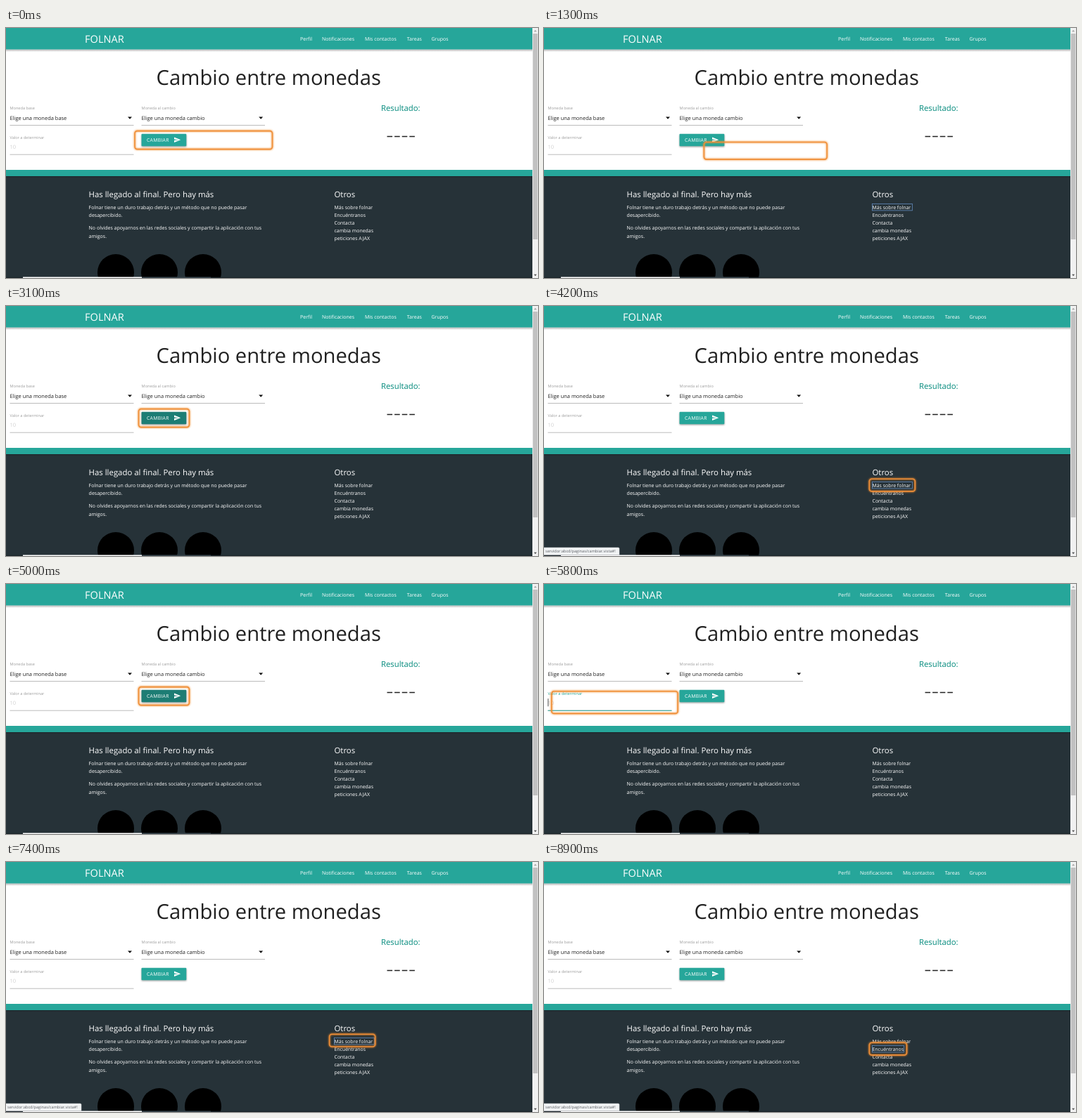
Animation, 756 px wide and 356 px high, one loop 9.8 s. Source, as an HTML page:

```html
<!DOCTYPE html>
<html lang="es">
<head>
<meta charset="utf-8">
<title>Cambio entre monedas</title>
<style>
  html, body { margin: 0; width: 100%; height: 100%; overflow: hidden; background: #fff; }
  svg { display: block; width: 756px; height: 356px; }
  text { font-family: "Open Sans", "Noto Sans", sans-serif; text-rendering: geometricPrecision; }
</style>
</head>
<body>
<svg id="stage" viewBox="0 0 756 356">
  <defs>
    <filter id="soft" x="-20%" y="-60%" width="140%" height="220%"><feGaussianBlur stdDeviation="1.3"/></filter>
    <linearGradient id="shade" x2="0" y2="1">
      <stop stop-color="#000" stop-opacity=".3"/>
      <stop offset="1" stop-color="#000" stop-opacity="0"/>
    </linearGradient>
  </defs>
  <rect width="756" height="356" fill="#fff"/>

  <rect y="30.5" width="748" height="3.5" fill="url(#shade)"/>
  <rect width="748" height="30.5" fill="#26a69a"/>

  <path d="M5.5 138.5H181.5M192.5 138.5H368M5.5 180.2H181.5" stroke="#9e9e9e" stroke-width=".7"/>
  <path id="inputLine" d="M5.5 180.2H181.5" stroke="#26a69a" stroke-width="1.1"/>
  <path d="M173 126.6h6l-3 3.2zM359.2 126.6h6l-3 3.2z" fill="#111"/>
  <path d="M541.5 154.5H581.5" stroke="#222" stroke-width="1.7" stroke-dasharray="7.6 3"/>

  <rect x="192.5" y="152" width="64" height="17.5" rx="1" fill="#000" opacity=".35" filter="url(#soft)"/>
  <rect id="button" x="192.5" y="150.8" width="63.8" height="17.4" rx="1"/>
  <path d="M239 163V159.9L245.5 159.2 239 158.5V155.4L248.2 159.2z" fill="#fff"/>

  <rect y="202" width="748" height="9.5" fill="#26a69a"/>
  <rect y="211" width="748" height="145" fill="#263238"/>
  <rect y="211" width="748" height="2" fill="url(#shade)"/>
  <circle cx="156" cy="348" r="26"/>
  <circle cx="218" cy="348" r="26"/>
  <circle cx="280" cy="348" r="26"/>

  <g id="labels"></g>
  <path id="caret" d="M5.9 163.2V174.3" stroke="#222" stroke-width=".8"/>
  <rect id="outline" fill="none" stroke="#6d9bd6" stroke-width=".7"/>

  <rect x="748" width="8" height="356" fill="#f1f1f1"/>
  <rect x="748.8" y="8" width="6.6" height="293" fill="#c1c1c1"/>
  <path d="M750.2 5.2h4l-2-2.4z" fill="#a3a3a3"/>
  <path d="M750.2 350.8h4l-2 2.4z" fill="#505050"/>

  <path d="M0 355.4H748" stroke="#1b2429" stroke-width="1.2"/>
  <path d="M193 355.2H291" stroke="#37434a" stroke-width="1.4"/>
  <path d="M24 355.3H193" stroke="#fff" stroke-width="1.4"/>
  <g id="status">
    <path d="M-1 344H105.5Q107 344 107 345.5V354.5H-1z" fill="#f1f3f4" stroke="#c4c7ca" stroke-width=".6"/>
    <text x="2" y="351.4" font-size="5.6" fill="#5f6368">servidor:abcd/paginas/cambiar.vista#!</text>
  </g>

  <rect class="ring" rx="3.5" fill="none" stroke="#f28a2a" stroke-width="3" opacity=".65" filter="url(#soft)"/>
  <rect class="ring" rx="3.5" fill="none" stroke="#ef8f38" stroke-width="1.6"/>
</svg>

<script>
const $ = id => document.getElementById(id);
const LOOP = 9800, FLIGHT = 300;

function setAttrs(el, attrs) {
  for (const key in attrs) el.setAttribute(key, attrs[key]);
  return el;
}

function label(x, y, size, fill, content, spacing = 0) {
  const el = document.createElementNS("http://www.w3.org/2000/svg", "text");
  setAttrs(el, { x, y, "font-size": size, fill, "letter-spacing": spacing });
  el.textContent = content;
  return $("labels").appendChild(el);
}

function lines(x, y, size, leading, list) {
  list.forEach((line, i) => label(x, y + i * leading, size, "#fff", line));
}

label(112, 21.3, 14.6, "#fff", "FOLNAR");
[[418, "Perfil"], [449, "Notificaciones"], [510, "Mis contactos"], [569.8, "Tareas"], [604.5, "Grupos"]]
  .forEach(([x, name]) => label(x, 18, 7, "#fff", name));

label(213.6, 81, 29.2, "#212121", "Cambio entre monedas");
label(5.5, 116, 5.6, "#9e9e9e", "Moneda base");
label(192.6, 116, 5.6, "#9e9e9e", "Moneda al cambio");
label(5.5, 130.9, 7.48, "#222", "Elige una moneda base");
label(192.6, 130.9, 7.48, "#222", "Elige una moneda cambio");
const inputLabel = label(5.5, 157.6, 5.6, "#9e9e9e", "Valor a determinar");
label(5.5, 172.2, 7.5, "#d1d1d1", "10");
label(200, 162.1, 6.85, "#fff", "CAMBIAR", 0.28);
label(533, 118, 11.3, "#00897b", "Resultado:");

label(117.6, 241, 11.4, "#fff", "Has llegado al final. Pero hay más");
label(466.5, 241, 11.4, "#fff", "Otros");
lines(117.6, 258, 7, 11.2,
  ["Folnar tiene un duro trabajo detrás y un método que no puede pasar", "desapercibido."]);
lines(117.6, 287.4, 7, 11.2,
  ["No olvides apoyarnos en las redes sociales y compartir la aplicación con tus", "amigos."]);
lines(466.5, 258, 6.95, 11,
  ["Más sobre folnar", "Encuéntranos", "Contacta", "cambia monedas", "peticiones AJAX"]);

// Ring boxes: x, y, width, height
const boxes = {
  field: [183, 146.6, 195.5, 26],
  button: [188.5, 146.6, 72, 26],
  input: [1.5, 153, 185, 32],
  about: [462.3, 246.3, 65, 17.6],
  findUs: [462.3, 257.3, 53.2, 17.6]
};
const isLink = name => name === "about" || name === "findUs";

const moves = [
  [-1000, "field"], [1260, "about"], [2580, "button"], [3850, "about"], [4560, "button"],
  [5584, "input"], [6560, "button"], [7140, "about"], [7720, "findUs"]
];

const clamp = v => Math.min(1, Math.max(0, v));
const mix = (a, b, k) => a + (b - a) * k;

// cubic-bezier(.25, .1, .25, 1)
function ease(p) {
  if (p <= 0 || p >= 1) return clamp(p);
  const curve = (a, b, u) => 3 * a * u * (1 - u) ** 2 + 3 * b * u * u * (1 - u) + u ** 3;
  let low = 0, high = 1;
  for (let i = 0; i < 24; i++) {
    const mid = (low + high) / 2;
    if (curve(0.25, 0.25, mid) < p) low = mid; else high = mid;
  }
  return curve(0.1, 1, low);
}

function blend(from, to, k) {
  return `rgb(${from.map((c, i) => Math.round(mix(c, to[i], k)))})`;
}

function render(t) {
  let index = moves.length - 1;
  while (moves[index][0] > t) index--;
  const [start, focus] = moves[index];
  const previous = index ? moves[index - 1][1] : focus;
  const age = t - start;

  const k = ease(age / FLIGHT);
  const [x, y, width, height] = boxes[focus].map((v, i) => mix(boxes[previous][i], v, k));
  document.querySelectorAll(".ring").forEach(el => setAttrs(el, { x, y, width, height }));

  const fade = clamp(age / 120);
  const active = name => focus === name ? fade : previous === name ? 1 - fade : 0;
  $("button").setAttribute("fill", blend([38, 166, 154], [29, 125, 116], active("button")));
  $("inputLine").setAttribute("opacity", active("input"));
  inputLabel.setAttribute("fill", blend([158, 158, 158], [38, 166, 154], active("input")));
  $("caret").setAttribute("opacity", focus === "input" && age % 1000 < 550 ? 1 : 0);

  const linked = isLink(focus);
  $("outline").setAttribute("opacity", linked ? 1 : 0);
  if (linked) {
    const [bx, by, bw, bh] = boxes[focus];
    setAttrs($("outline"), { x: bx + 4, y: by + 4, width: bw - 8, height: bh - 8 });
  }
  const shown = linked ? isLink(previous) || age > 120 : isLink(previous) && age < 320;
  $("status").setAttribute("opacity", shown ? 1 : 0);
}

const origin = performance.now();
function tick() {
  render((performance.now() - origin) % LOOP);
  requestAnimationFrame(tick);
}
tick();
</script>
</body>
</html>
```
